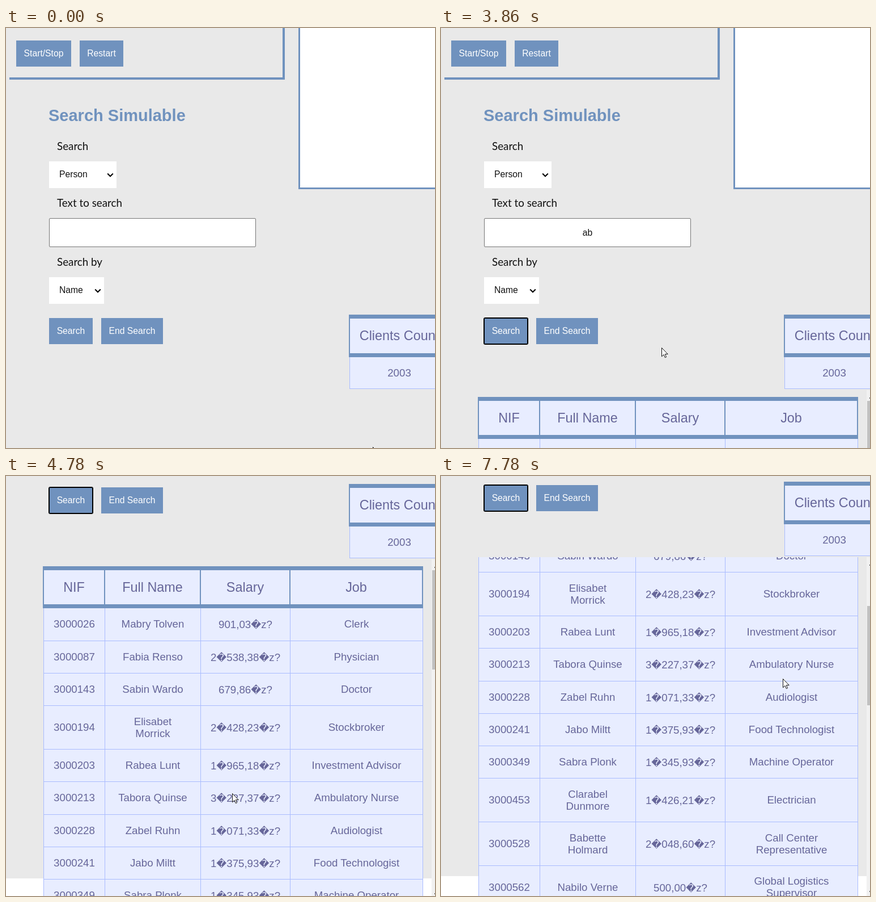
An HTML page that plays this animation: 757x740 px, repeating every 8000 ms.

```html
<!DOCTYPE html>
<html lang="en">
<head>
<meta charset="utf-8">
<title>Search form</title>
<style>
  html, body { margin: 0; width: 100%; height: 100%; overflow: hidden; background: #fff; }
  body { position: relative; font: 15.7px "Liberation Sans", Arial, sans-serif; color: #111; }
  #page, #page > *, #list > *, #cursor { position: absolute; box-sizing: border-box; }
  #page { left: 0; top: 0; width: 757px; height: 1200px; background: #e9e9e9; white-space: nowrap; }
  #page > label { left: 90px; font: 18.8px/30px Lato, Carlito, sans-serif; }
  h2 { margin: 0; left: 75px; top: 139px; font-size: 29px; line-height: 30px; color: #7092be; }
  .button { height: 46px; line-height: 45px; background: #7092be; color: #fff; text-align: center; }
  .select { left: 76px; height: 47px; line-height: 46px; padding-left: 18px; background: #fff; }
  .select svg { position: absolute; right: 5px; top: 20px; }
  .panel { border: 0 solid #7092be; }
  #field { left: 76px; top: 335px; width: 365px; height: 51px; border: 1px solid #767676; border-radius: 2px;
    background: #fff; line-height: 49px; text-align: center; }
  #caret { display: inline-block; width: 1px; height: 18px; margin-right: -1px; vertical-align: -4px; background: #000; }
  #field.hover, .button.hover { background: #648cc1; }
  #field.focus { box-shadow: inset 0 0 0 1px #000; border-color: #000; border-radius: 4px; }
  .button.focus { box-shadow: 0 0 0 1px #000, inset 0 0 0 1px #000; border-radius: 2px; }
  #list { left: 0; top: 638px; width: 757px; height: 603px; overflow: hidden; }
  #rows { left: 66px; top: 12px; }
  .row { display: grid; grid-template-columns: 108px 169px 158px 234px; box-sizing: border-box;
    height: 57.3px; border-left: 1px solid #aabcfe; }
  .row.tall { height: 76.8px; }
  .row > *, .cell { display: flex; align-items: center; justify-content: center; box-sizing: border-box;
    text-align: center; white-space: pre-line; background: #e8edff; color: #669;
    font-size: 18.7px; line-height: 21px; border: 0 solid #aabcfe; border-width: 0 1px 1px 0; }
  .row > * { padding-bottom: 1px; }
  .row > :nth-child(3) { padding: 1px 0 0; }
  .row i { font: 17.5px/0 "DejaVu Sans", sans-serif; }
  .row.head { height: 74.3px; margin-left: -1px; width: 671px; border-left: 2px solid #7092be; }
  .row.head > *, .cell.head { padding: 0; font-size: 23.4px; border: 0 solid #7092be; border-width: 7px 2px 7px 0; }
  #track { left: 751px; top: 0; width: 6px; height: 603px; background: #f1f1f1; }
  #thumb { left: 752px; top: 19px; width: 5px; height: 175px; background: #c1c1c1; }
  .tip { left: 756px; width: 1px; height: 2px; background: #505050; }
  #cursor { left: 0; top: 0; overflow: visible; }
</style>
</head>
<body>
<div id="page">
  <div class="panel" style="left:6px;top:-10px;width:486px;height:101px;border-width:0 4px 4px 0"></div>
  <div class="panel" style="left:516px;top:-10px;width:260px;height:294px;border-width:0 0 3px 3px;background:#fff"></div>
  <div class="button" style="left:18px;top:22px;width:97px">Start/Stop</div>
  <div class="button" style="left:130px;top:22px;width:77px">Restart</div>
  <h2>Search Simulable</h2>
  <label style="top:193px">Search</label>
  <div class="select" style="top:235px;width:119px">Person</div>
  <label style="top:293px">Text to search</label>
  <div id="field"><span id="typed"></span><span id="caret"></span></div>
  <label style="top:397px">Search by</label>
  <div class="select" style="top:439px;width:97px">Name</div>
  <div class="button" id="search" style="left:76px;top:511px;width:77px">Search</div>
  <div class="button" style="left:168px;top:511px;width:109px">End Search</div>
  <div class="cell head" style="left:605px;top:505px;width:178px;height:75px;border-left-width:2px;white-space:nowrap">Clients Count</div>
  <div class="cell" style="left:606px;top:580px;width:176px;height:56px;border-left-width:1px">2003</div>
  <div id="list">
    <div id="rows"></div>
    <div id="track"></div>
    <div id="thumb"></div>
    <div class="tip" style="top:13px"></div>
    <div class="tip" style="top:588px"></div>
  </div>
</div>
<svg id="cursor" width="14" height="20">
  <path id="arrow" d="M.5.5v15.3l3.5-3.3 2.4 5.2 2.2-1-2.3-5.1h4.9z" fill="#fff" stroke="#111"/>
  <path id="beam" d="M-3 -7.5h2.5l1 1 1-1h2.5M.5 -6.5v14M-3 8.5h2.5l1-1 1 1h2.5" fill="none" stroke="#4d5a6c"/>
</svg>
<script>
const LOOP = 8000, TICK = 76.8, CLICK_FIELD = 760, CLICK_SEARCH = 3140;
const $ = id => document.getElementById(id);

const people = [
  '3000026|Mabry Tolven|901,03|Clerk',
  '3000087|Fabia Renso|2 538,38|Physician',
  '3000143|Sabin Wardo|679,86|Doctor',
  '3000194|Elisabet\nMorrick|2 428,23|Stockbroker',
  '3000203|Rabea Lunt|1 965,18|Investment Advisor',
  '3000213|Tabora Quinse|3 227,37|Ambulatory Nurse',
  '3000228|Zabel Ruhn|1 071,33|Audiologist',
  '3000241|Jabo Miltt|1 375,93|Food Technologist',
  '3000349|Sabra Plonk|1 345,93|Machine Operator',
  '3000453|Clarabel\nDunmore|1 426,21|Electrician',
  '3000528|Babette\nHolmard|2 048,60|Call Center\nRepresentative',
  '3000562|Nabilo Verne|500,00|Global Logistics\nSupervisor',
  '3000617|Taber Ollin|1 218,45|Clerk',
  '3000684|Crabbe Winno|1 702,16|Electrician'
];
const row = (cells, kind) =>
  `<div class="row ${kind}">${cells.map(c => `<div><span>${c}</span></div>`).join('')}</div>`;
$('rows').innerHTML = row(['NIF', 'Full Name', 'Salary', 'Job'], 'head') + people.map(line => {
  const [nif, name, salary, job] = line.split('|');
  const money = (salary + ' z?').replace(/ /g, '<i>&#xFFFD;</i>');
  return row([nif, name, money, job], line.includes('\n') ? 'tall' : '');
}).join('');

for (const select of document.querySelectorAll('.select'))
  select.innerHTML += '<svg width="12" height="9"><path d="M1.2 1.5l4.8 4.8 4.8-4.8" fill="none" stroke="#000" stroke-width="2"/></svg>';

// Pointer stops: time, x, y
const stops = [
  [0, 647, 738], [690, 297, 366], [2400, 297, 366], [3060, 118, 530], [3320, 118, 530],
  [3610, 378, 555], [3700, 378, 555], [3830, 389, 563], [4060, 389, 563], [4290, 390, 564],
  [4600, 390, 564], [4760, 399, 559], [4950, 399, 559], [5220, 399, 549], [5690, 399, 549],
  [5760, 411, 550], [6520, 602, 340], [6680, 602, 340], [7200, 603, 357], [LOOP, 603, 357]
];

const ramp = (t, from, to) => {
  const u = Math.min(1, Math.max(0, (t - from) / (to - from)));
  return u * u * (3 - 2 * u);
};
const pointerAt = t => {
  const i = stops.findIndex(s => s[0] > t);
  const [a, b] = [stops[i - 1], stops[i]];
  const u = ramp(t, a[0], b[0]);
  return [1, 2].map(k => Math.round(a[k] + (b[k] - a[k]) * u));
};

function draw(time) {
  const t = Math.floor(time / TICK) * TICK;
  const searched = t >= CLICK_SEARCH;
  const focused = t >= CLICK_FIELD && !searched;
  const pageScroll = 462 * ramp(t, 4055, 4450) + 33.5 * ramp(t, 4550, 4818);
  const listScroll = 115.5 * (ramp(t, 4950, 5215) + 2 * ramp(t, 6610, 7440) - ramp(t, 7460, 7750));

  $('page').style.top = -Math.floor(pageScroll) + 'px';
  $('rows').style.top = 12 - Math.floor(listScroll) + 'px';
  $('thumb').style.top = 19 + Math.round(listScroll * .29) + 'px';
  $('list').style.display = searched ? '' : 'none';

  const [x, y] = pointerAt(t);
  const inField = pageScroll === 0 && x > 75 && x < 441 && y > 334 && y < 386;
  const inSearch = pageScroll === 0 && x > 75 && x < 153 && y > 510 && y < 557;
  $('cursor').style.transform = `translate(${x}px,${y}px)`;
  $('arrow').style.display = inField ? 'none' : '';
  $('beam').style.display = inField ? '' : 'none';

  $('field').className = (inField ? 'hover ' : '') + (focused ? 'focus' : '');
  $('search').className = 'button ' + (inSearch ? 'hover ' : '') + (searched ? 'focus' : '');
  $('typed').textContent = t < 1760 ? '' : t < 1915 ? 'a' : 'ab';
  const caretOn = t < 1225 || (t > 1685 && t < 2440) || t > 2930;
  $('caret').style.visibility = focused && caretOn ? 'visible' : 'hidden';
}

(function loop() {
  draw(performance.now() % LOOP);
  requestAnimationFrame(loop);
})();
</script>
</body>
</html>
```
